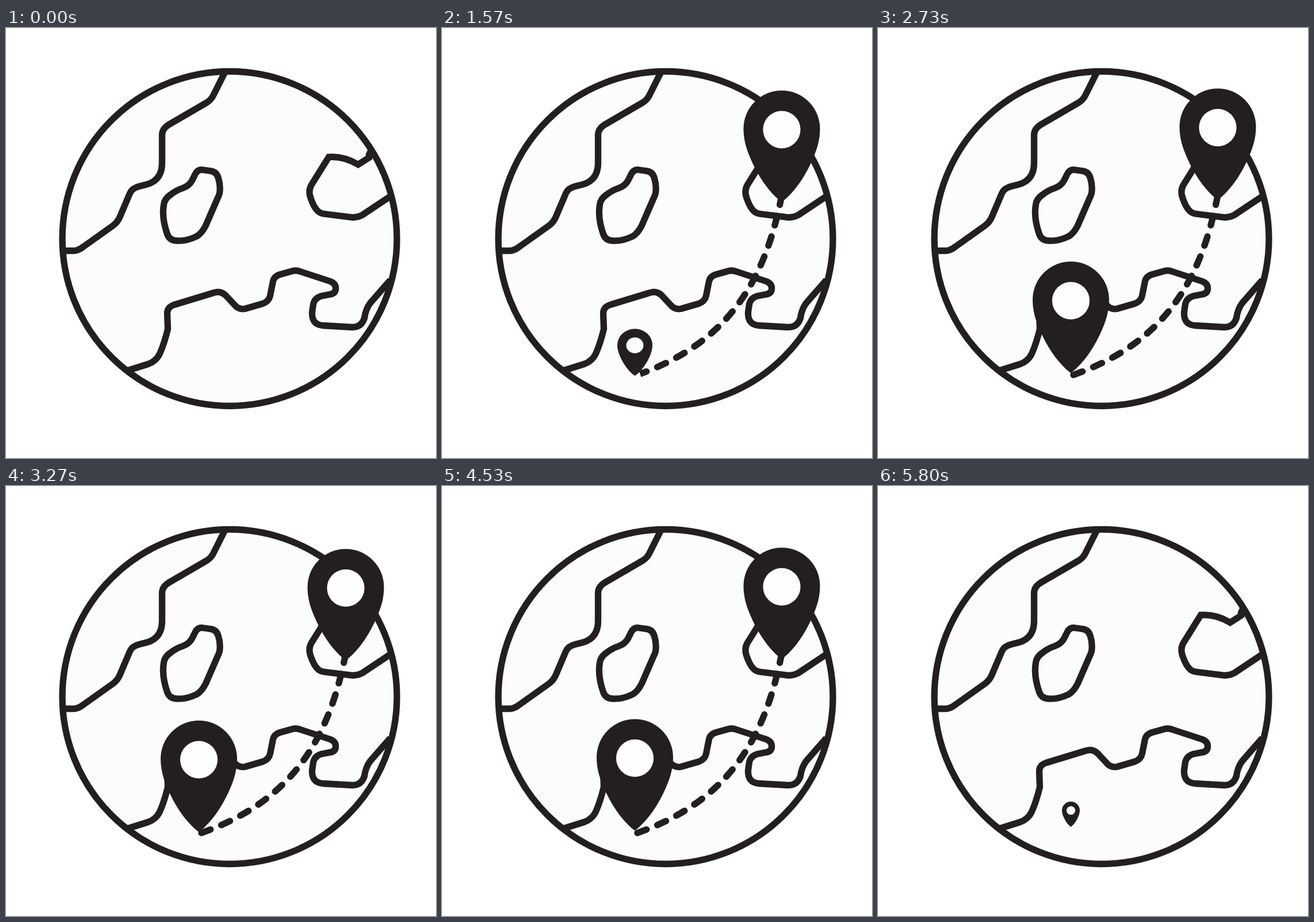
Animation of 748x748 px, one loop 5860 ms. Source, as an HTML page:

```html
<!DOCTYPE html>
<html lang="en">
<head>
<meta charset="utf-8">
<title>Globe route</title>
<style>
  html, body { margin: 0; width: 100%; height: 100%; overflow: hidden; background: #fff; }
  svg { display: block; width: 100vw; height: 100vh; }
  .line { fill: none; stroke: #231f20; stroke-width: 11.3; }
  .round { stroke-linejoin: round; }
</style>
</head>
<body>
<svg viewBox="0 0 748 748">
  <defs>
    <g id="pin">
      <path fill="#231f20" d="M0 0C-24-18-43-49-54-75C-62-93-66.5-109-66.5-127.5A66.5 66.5 0 0 1 66.5-127.5C66.5-109 62-93 54-75C43-49 24-18 0 0Z"/>
      <circle cy="-126" r="32.6" fill="#fdfdfd"/>
    </g>
    <mask id="wipe" maskUnits="userSpaceOnUse" x="0" y="0" width="748" height="748">
      <path id="reveal" fill="none" stroke="#fff" stroke-width="24" pathLength="1"
        d="M592.2 284L591 291C561.5 443 496 549 340 604L333 606.5"/>
    </mask>
  </defs>

  <circle cx="389" cy="366.5" r="291" fill="#fcfcfc"/>
  <g class="line" transform="translate(-.5 -.5)">
    <path class="round" d="M381 78L362 116Q358 125 350 130L283 169Q272 176 272 187V235Q272 266 244 273L232 276Q220 279 216 288L199 328Q195 338 187 344L135 381Q126 388 118 388H100"/>
    <path class="round" d="M341 247L355 249Q367 250 370 262Q374 275 372 288Q371 292 368 298L348 344Q341 358 332 363Q313 372 297 370.5Q285 370 281 359Q271 330 275 308Q276 298 286 291Q296 283 308 279Q319 275 324 266L329 256Q333 247 341 247Z"/>
    <path d="M636 212L632 221V226L613 238Q588 223 562 225L532 273Q526 283 530 295Q536 313 543 319Q547 323 555 324L604 330Q612 330 620 326L668 294"/>
    <path class="round" d="M213 596L248 585Q262 580 268 567Q276 549 282 524L281 497Q281 486 293 482L362 461Q374 457 383 466L397 481Q405 491 416 489L447 480Q458 476 460 466L465 441Q467 432 478 429L496 424Q504 421 512 424L564 441Q575 445 574 455Q573 463 563 464L553 466Q538 468 535 481L533 495Q532 516 551 518L603 521Q619 521 624 505Q626 490 634 479L669 439"/>
  </g>
  <circle class="line" cx="389" cy="366.5" r="291"/>
  <g id="route" mask="url(#wipe)">
    <path class="line" stroke-linecap="round" pathLength="432.8" stroke-dasharray="17 20.8"
      d="M591 291C561.5 443 496 548 340 603.5"/>
  </g>
  <use id="start" href="#pin"/>
  <use id="end" href="#pin"/>
</svg>
<script>
const LOOP = 5860, DELAY = 270, BOB = 43;
const BEATS = [0, 30, 60, 100, 130]; // five picture changes per 200 ms
const get = id => document.getElementById(id);
const start = get("start"), end = get("end"), route = get("route"), reveal = get("reveal");

// Rows of [step, value...], linear in between
function at(keys, k) {
  const i = keys.findIndex(row => row[0] >= k);
  if (i < 0) return keys[keys.length - 1].slice(1);
  if (i === 0) return keys[0].slice(1);
  const a = keys[i - 1], b = keys[i], u = (k - a[0]) / (b[0] - a[0]);
  return a.slice(1).map((v, j) => v + (b[j + 1] - v) * u);
}

const POP = [
  [0, 0, 0], [1, .233, .227], [2, .61, .55], [3, .965, .87],
  [4, 1.28, 1.14], [5, 1.23, 1.12], [7, 1.1, 1.08], [10, 1, 1]
];
const DRAW = [[9, 0], [15, .22], [30, .88], [34, .972], [36, 1]];
const ERASE = [[122, 0], [125, .14], [131, .8], [134, 1]];

const PINS = [
  { el: start, x: 591, inAt: .4, outAt: 125, mid: 297.3, amp: 7.5, high: 50.4,
    from: [5, 297], bobFrom: 28.9, bobTo: 110, to: [121, 284.5] },
  { el: end, x: 335.5, inAt: 32.4, outAt: 141, mid: 604, amp: 5, high: 68,
    from: [34, 605], bobFrom: 46.5, bobTo: 122, to: [136, 593] }
];

function glide(k, [k0, y0], [k1, y1]) {
  const u = Math.min(1, Math.max(0, (k - k0) / (k1 - k0)));
  return y0 + (y1 - y0) * (1 - Math.cos(Math.PI * u)) / 2;
}

function tipY(p, k) {
  const bob = s => p.mid - p.amp * Math.cos(2 * Math.PI * (s - p.high) / BOB);
  if (k < p.bobFrom) return glide(k, p.from, [p.bobFrom, bob(p.bobFrom)]);
  if (k > p.bobTo) return glide(k, [p.bobTo, bob(p.bobTo)], p.to);
  return bob(k);
}

function stepAt(t) {
  const s = t - DELAY;
  if (s < 0) return 0;
  return 5 * Math.floor(s / 200) + BEATS.filter(b => b <= s % 200).length;
}

function draw(k) {
  for (const p of PINS) {
    const [sx, sy] = at(POP, Math.min(k - p.inAt, p.outAt - k));
    p.el.style.display = sx > 0 ? "" : "none";
    p.el.setAttribute("transform", `translate(${p.x} ${tipY(p, k)}) scale(${sx} ${sy})`);
  }
  const [a] = at(ERASE, k), [b] = at(DRAW, k);
  route.style.display = b > a ? "" : "none";
  reveal.setAttribute("stroke-dasharray", `0 ${a} ${b - a} 2`);
}

const t0 = performance.now();
function tick() {
  draw(stepAt((performance.now() - t0) % LOOP));
  requestAnimationFrame(tick);
}
draw(0);
requestAnimationFrame(tick);
</script>
</body>
</html>
```
